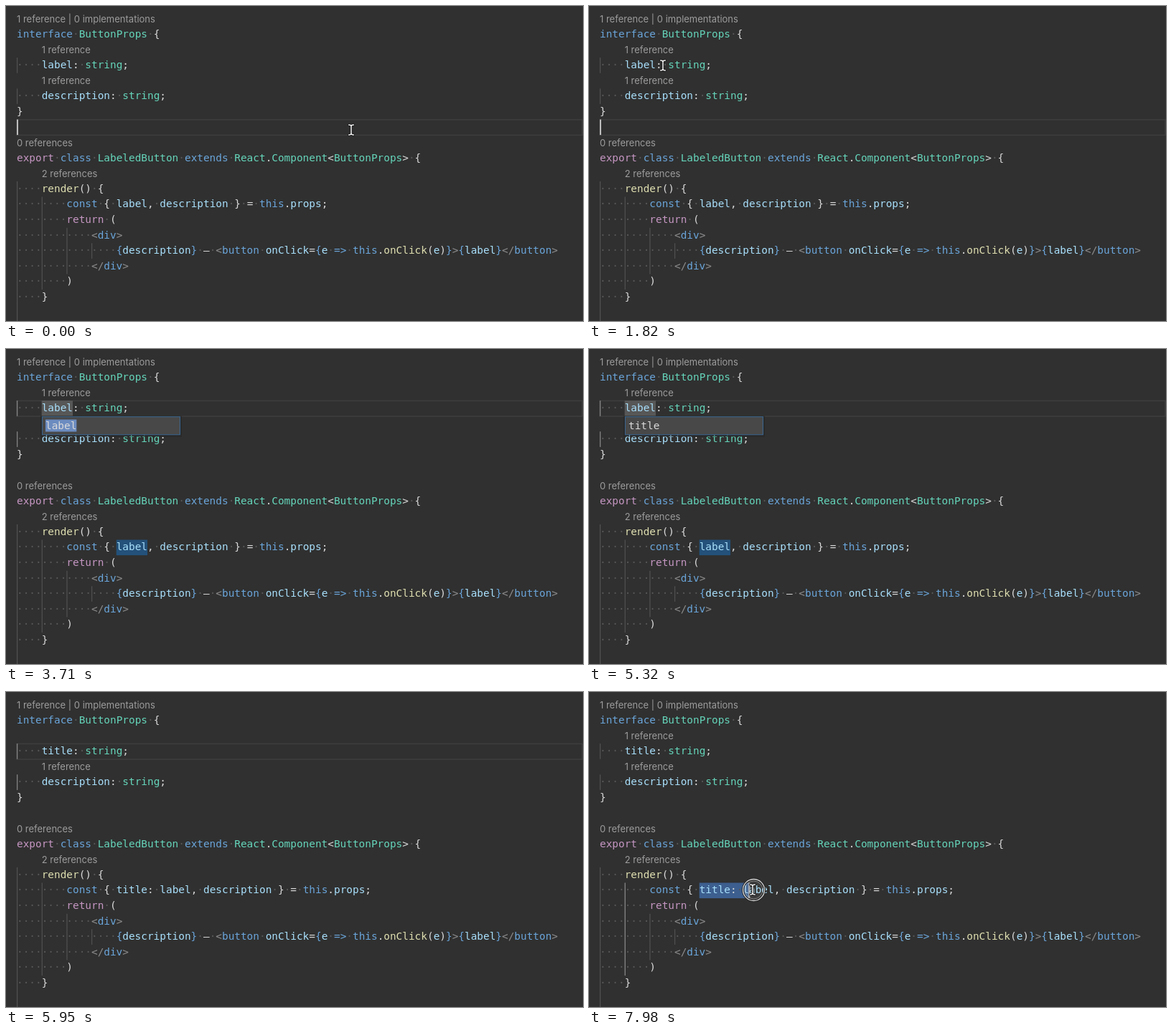
An HTML page that plays this animation: 804 by 440 pixels, repeating every 8000 ms.

```html
<!DOCTYPE html>
<html lang="en">
<head>
<meta charset="utf-8">
<title>Rename symbol</title>
<style>
html, body { margin: 0; width: 100%; height: 100%; overflow: hidden; background: #303030; }
svg { display: block; width: 804px; height: 440px; }
text { font: 14.4px "DejaVu Sans Mono", monospace; white-space: pre; }
.lens { font: 13px Inter, sans-serif; fill: #9c9c9c; }
.w { fill: #dadada; }
.b { fill: #6aa5da; }
.t { fill: #65d5ba; }
.l { fill: #a8dffb; }
.p { fill: #c596c2; }
.y { fill: #dfdfb1; }
.g { fill: #8c8c8c; }
.dot { fill: #585858; }
.guide { fill: #515151; }
.active { fill: #858585; }
.line { fill: none; stroke: #3e3e3e; stroke-width: 1.5; }
.caret { fill: #bdbdbd; }
#mouse { animation: move 8s ease-in-out infinite; }
@keyframes move {
  0%, 3.5% { transform: translate(481px, 173px); }
  21%, 22.75% { transform: translate(103px, 83px); }
  29%, 78.75% { transform: translate(76px, 84px); }
  91.5% { transform: translate(156px, 276px); }
  96% { transform: translate(156px, 276px); animation-timing-function: linear; }
  99.5%, 100% { transform: translate(228px, 276px); }
}
#selection { transform-box: fill-box; transform-origin: 0 0; animation: select 8s infinite; }
@keyframes select {
  0% { transform: scaleX(0); }
  96% { transform: scaleX(0); animation-timing-function: steps(8); }
  99.5%, 100% { transform: scaleX(1); }
}
#dragCaret { animation: drag 8s infinite; }
@keyframes drag {
  0% { transform: translateX(0); }
  96% { transform: translateX(0); animation-timing-function: steps(8); }
  99.5%, 100% { transform: translateX(69.4px); }
}
</style>
</head>
<body>
<svg id="stage" viewBox="0 0 804 440"></svg>
<script>
const LOOP = 8000, LEFT = 15, CHAR = 8.67, ROW = 21.6;
const CLICK = 2600, MARK = 2870, OPEN = 3430, CLOSE = 5450, EDIT = 5530, PRESS = 7630;
const svg = document.getElementById('stage');
const sheet = document.head.appendChild(document.createElement('style'));
const colX = n => LEFT + n * CHAR;
const rowY = row => 28.9 + ROW * (row - 1);
let count = 0;

function add(tag, attrs, parent = svg) {
  const el = document.createElementNS('http://www.w3.org/2000/svg', tag);
  for (const key in attrs) el.setAttribute(key, attrs[key]);
  return parent.appendChild(el);
}

// Shows an element only inside the given [start, end] spans, in ms.
function during(el, ...spans) {
  const name = 'show' + count++;
  let frames = spans[0][0] > 0 ? '0%{opacity:0}' : '';
  for (const [start, end] of spans) {
    frames += `${start / LOOP * 100}%{opacity:1}`;
    frames += end < LOOP ? `${end / LOOP * 100}%{opacity:0}` : '100%{opacity:1}';
  }
  // Hold the last state instead of falling back to the element's own opacity.
  if (spans[spans.length - 1][1] < LOOP) frames += '100%{opacity:0}';
  sheet.textContent += `@keyframes ${name}{${frames}}`;
  el.style.animation = `${name} ${LOOP}ms step-end infinite`;
  return el;
}

const rect = (x, y, width, height, attrs, parent) =>
  add('rect', { x, y, width, height, ...attrs }, parent);

// Colour marks such as [b] start a run; spaces become whitespace dots.
function code(row, indent, source) {
  const text = add('text', { x: LEFT, y: rowY(row) + 14.8 });
  const run = (cls, str) => { add('tspan', { class: cls }, text).textContent = str; };
  const parts = ('[w]' + ' '.repeat(indent) + source).split(/\[(\w)\]/);
  for (let i = 1; i < parts.length; i += 2) {
    for (const str of parts[i + 1].match(/ +|[^ ]+/g) || []) {
      if (str[0] === ' ') run('dot', '·'.repeat(str.length));
      else run(parts[i], str);
    }
  }
  return text;
}

function lens(row, indent, str) {
  const text = add('text', { class: 'lens', x: colX(indent), y: 22.9 + ROW * row });
  text.textContent = str;
  return text;
}

const guide = (indent, first, last, cls = 'guide') =>
  rect(colX(indent), rowY(first), 1.2, ROW * (last - first + 1), { class: cls });

const currentLine = row => rect(LEFT, rowY(row) + 0.3, 788, ROW, { class: 'line' });

// Backgrounds
during(currentLine(7), [0, CLICK]);
during(currentLine(3), [CLICK, PRESS]);
during(rect(colX(4), rowY(3), 5 * CHAR, ROW, { fill: '#575757' }), [MARK, EDIT]);
during(rect(colX(16), rowY(12), 5 * CHAR, ROW, { fill: '#23517a' }), [MARK, EDIT]);
rect(colX(16), rowY(12), 8 * CHAR, ROW, { fill: '#3c5f8f', id: 'selection' });

guide(0, 3, 3);
guide(0, 5, 5);
guide(0, 11, 20);
guide(4, 12, 17);
guide(8, 14, 16);
guide(12, 15, 15);
for (const row of [3, 5]) during(guide(0, row, row, 'active'), [CLICK, PRESS]);
during(guide(4, 12, 17, 'active'), [PRESS, LOOP]);

// Text
lens(0, 0, '1 reference | 0 implementations');
during(lens(2, 4, '1 reference'), [0, EDIT], [6300, LOOP]);
lens(4, 4, '1 reference');
lens(8, 0, '0 references');
lens(10, 4, '2 references');

code(1, 0, '[b]interface [t]ButtonProps [w]{');
during(code(3, 4, '[l]label[w]: [t]string[w];'), [0, EDIT]);
during(code(3, 4, '[l]title[w]: [t]string[w];'), [EDIT, LOOP]);
code(5, 4, '[l]description[w]: [t]string[w];');
code(6, 0, '}');
code(9, 0, '[p]export [b]class [t]LabeledButton [b]extends [t]React[w].[t]Component[w]<[t]ButtonProps[w]> {');
code(11, 4, '[y]render[w]() {');
const destructure = names => code(12, 8, `[b]const [w]{ ${names}, [l]description [w]} = [b]this[w].[l]props[w];`);
during(destructure('[l]label[w]'), [0, EDIT]);
during(destructure('[l]title[w]: [l]label[w]'), [EDIT, LOOP]);
code(13, 8, '[p]return [w](');
code(14, 12, '[g]<[b]div[g]>');
code(15, 16, '[b]{[l]description[b]} [w]— [g]<[b]button [l]onClick[w]=[b]{[l]e [b]=> this[w].[y]onClick[w]([l]e[w])[b]}[g]>[b]{[l]label[b]}[g]</[b]button[g]>');
code(16, 12, '[g]</[b]div[g]>');
code(17, 8, ')');
code(18, 4, '}');

// Text carets
const caret = (x, row, attrs, parent) => rect(x, rowY(row), 2, ROW, { class: 'caret', ...attrs }, parent);
during(caret(15, 7), [0, 200], [700, 1200], [1700, 2200]);
during(caret(colX(7) - 1, 3), [CLICK, 3100], [CLOSE, 5940], [6440, 6940], [7440, PRESS]);
caret(colX(16) - 1, 12, { id: 'dragCaret' }, during(add('g', {}), [PRESS, LOOP]));

// Rename box
const box = during(add('g', {}), [OPEN, CLOSE]);
rect(48, 93, 197, 30, { fill: '#222', opacity: 0.35 }, box);
rect(50.5, 94.7, 192, 25, { fill: '#484848', stroke: '#39658f' }, box);
function entry(str, start, end, selected) {
  const g = during(add('g', {}, box), [start, end]);
  const width = str.length * CHAR;
  if (selected) rect(55, 98.5, width, 17, { fill: '#6c8cc0' }, g);
  add('text', { class: 'w', x: 55, y: 111.7 }, g).textContent = str;
  if (!selected) during(rect(55 + width, 98.5, 1.2, 17, { class: 'caret' }, g), [start, Math.min(end, 5260)]);
}
entry('label', OPEN, 4060, true);
const keyTimes = [4060, 4200, 4340, 4550, 4760, CLOSE];
for (let i = 0; i < 5; i++) entry('title'.slice(0, i + 1), keyTimes[i], keyTimes[i + 1]);

// Mouse pointer with its press ring
const mouse = add('g', { id: 'mouse' });
const ring = during(add('g', {}, mouse), [CLICK, 2740], [PRESS, LOOP]);
add('circle', { cx: 1.5, cy: 0.5, r: 15, fill: '#fff', 'fill-opacity': 0.06, stroke: '#222', 'stroke-width': 3 }, ring);
add('circle', { cx: 1.5, cy: 0.5, r: 15, fill: 'none', stroke: '#d8d8d8', 'stroke-width': 1.3 }, ring);
add('circle', { cx: 1.5, cy: 0.5, r: 12.5, fill: 'none', stroke: '#ccc', 'stroke-width': 0.8, opacity: 0.6 }, ring);
const beam = during(add('g', { fill: 'none', 'stroke-linecap': 'round' }, mouse), [0, OPEN], [6240, LOOP]);
const d = 'M-3.3-7Q-.4-7 0-5.2Q.4-7 3.3-7M0-5.2V5.2M-3.3 7Q-.4 7 0 5.2Q.4 7 3.3 7';
add('path', { d, stroke: '#1c1c1c', 'stroke-width': 3.4 }, beam);
add('path', { d, stroke: '#f4f4f4', 'stroke-width': 1.5 }, beam);
</script>
</body>
</html>
```
